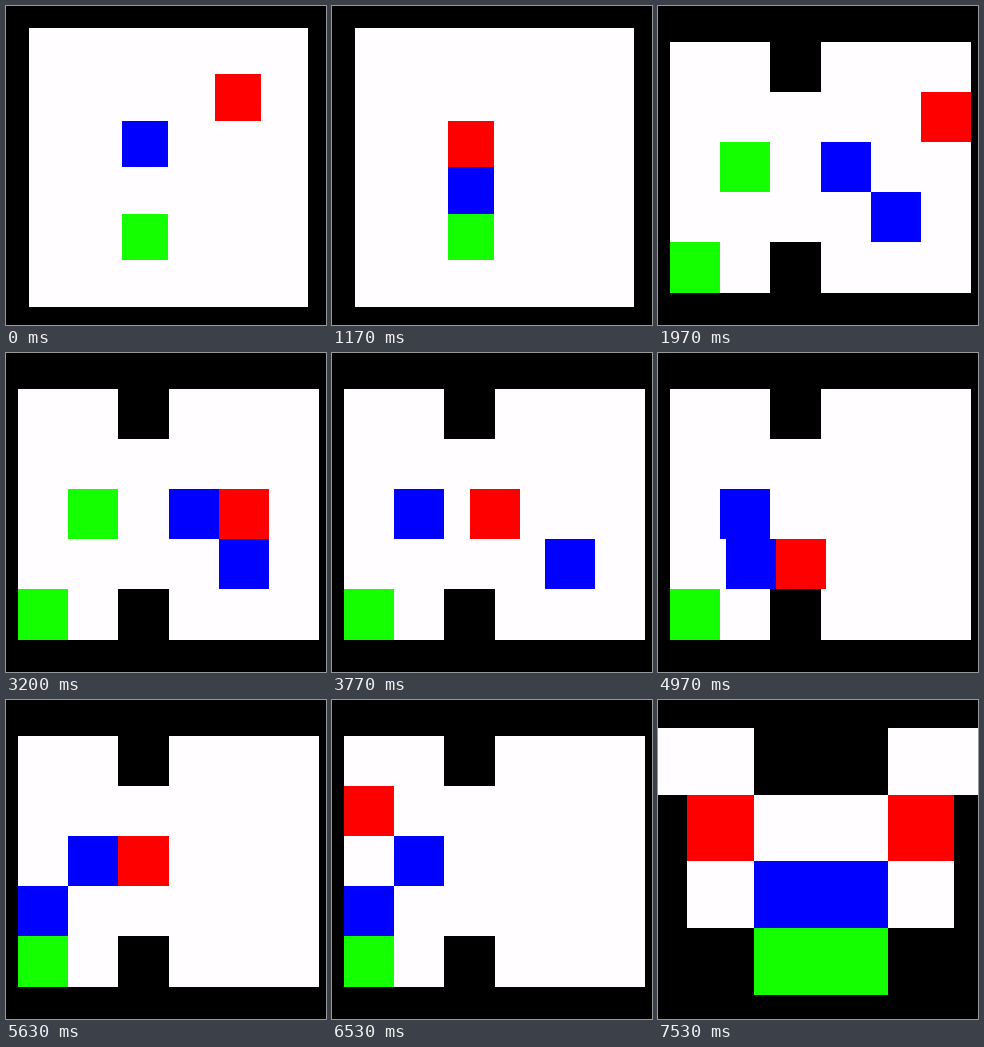
Animation of 320x319 px, one loop 8000 ms. Source, as an HTML page with a canvas:

```html
<!DOCTYPE html>
<html lang="en">
<head>
<meta charset="utf-8">
<title>Block pushing puzzle</title>
<style>
  html, body { margin: 0; width: 100%; height: 100%; overflow: hidden; background: #000; }
  canvas { display: block; }
</style>
</head>
<body>
<canvas id="stage" width="320" height="319"></canvas>
<script>
const LOOP = 8000;
const SLIDE = 120;
const FLOOR = '#fffdff', GOAL = '#14ff00', BLOCK = '#0000ff', PLAYER = '#ff0000';
const DIRS = { L: [-1, 0], R: [1, 0], U: [0, -1], D: [0, 1] };

// Map legend: # wall, . floor, g goal, b block, p player. Moves are [start ms, direction].
const levels = [
  {
    start: 0, x: 23, y: 22, cell: 46.5,
    map: ['......', '....p.', '..b...', '......', '..g...', '......'],
    moves: [[100, 'L'], [510, 'L'], [910, 'D'], [1280, 'D']]
  },
  {
    start: 1800, x: 12.4, y: 36.1, cell: 50.2,
    map: ['..#...', '.....p', '.g.b..', '....b.', 'g.#...'],
    moves: [
      [2710, 'L'], [3080, 'D'], [3310, 'L'], [3510, 'L'],
      [3710, 'R'], [3910, 'R'], [4110, 'R'], [4300, 'D'],
      [4480, 'L'], [4665, 'L'], [4865, 'L'], [5065, 'L'],
      [5280, 'R'], [5490, 'U'], [5850, 'U'], [6040, 'L'],
      [6310, 'L'], [6550, 'D'], [6880, 'D']
    ]
  },
  {
    start: 7400, x: -37.6, y: 28.15, cell: 66.9,
    map: ['..##..', '#p..p#', '#.bb.#', '##gg##'],
    moves: []
  }
];

const ctx = document.getElementById('stage').getContext('2d');

function find(map, mark) {
  const cells = [];
  map.forEach((row, y) => [...row].forEach((c, x) => {
    if (mark.includes(c)) cells.push({ x, y });
  }));
  return cells;
}

// Replays the moves up to time t; the latest one may be partly done.
function replay(level, t) {
  const players = find(level.map, 'p');
  const blocks = find(level.map, 'b');
  for (const [at, key] of level.moves) {
    if (t <= at) break;
    const part = Math.min(1, (t - at) / SLIDE);
    const [dx, dy] = DIRS[key];
    const hero = players[0];
    const pushed = blocks.find(b => b.x === hero.x + dx && b.y === hero.y + dy);
    for (const item of [hero, pushed]) {
      if (!item) continue;
      item.x += dx * part;
      item.y += dy * part;
    }
  }
  return { players, blocks };
}

function paint(level, cells, color) {
  const { x, y, cell } = level;
  ctx.fillStyle = color;
  for (const c of cells) {
    const left = Math.floor(x + c.x * cell), right = Math.floor(x + (c.x + 1) * cell);
    const top = Math.floor(y + c.y * cell), bottom = Math.floor(y + (c.y + 1) * cell);
    ctx.fillRect(left, top, right - left, bottom - top);
  }
}

function draw(t) {
  const level = levels.filter(l => l.start <= t).pop();
  const { players, blocks } = replay(level, t);
  ctx.fillStyle = '#000';
  ctx.fillRect(0, 0, 320, 319);
  paint(level, find(level.map, '.gbp'), FLOOR);
  paint(level, find(level.map, 'g'), GOAL);
  paint(level, blocks, BLOCK);
  paint(level, players, PLAYER);
}

const begin = performance.now();
function tick() {
  draw((performance.now() - begin) % LOOP);
  requestAnimationFrame(tick);
}
tick();
</script>
</body>
</html>
```
